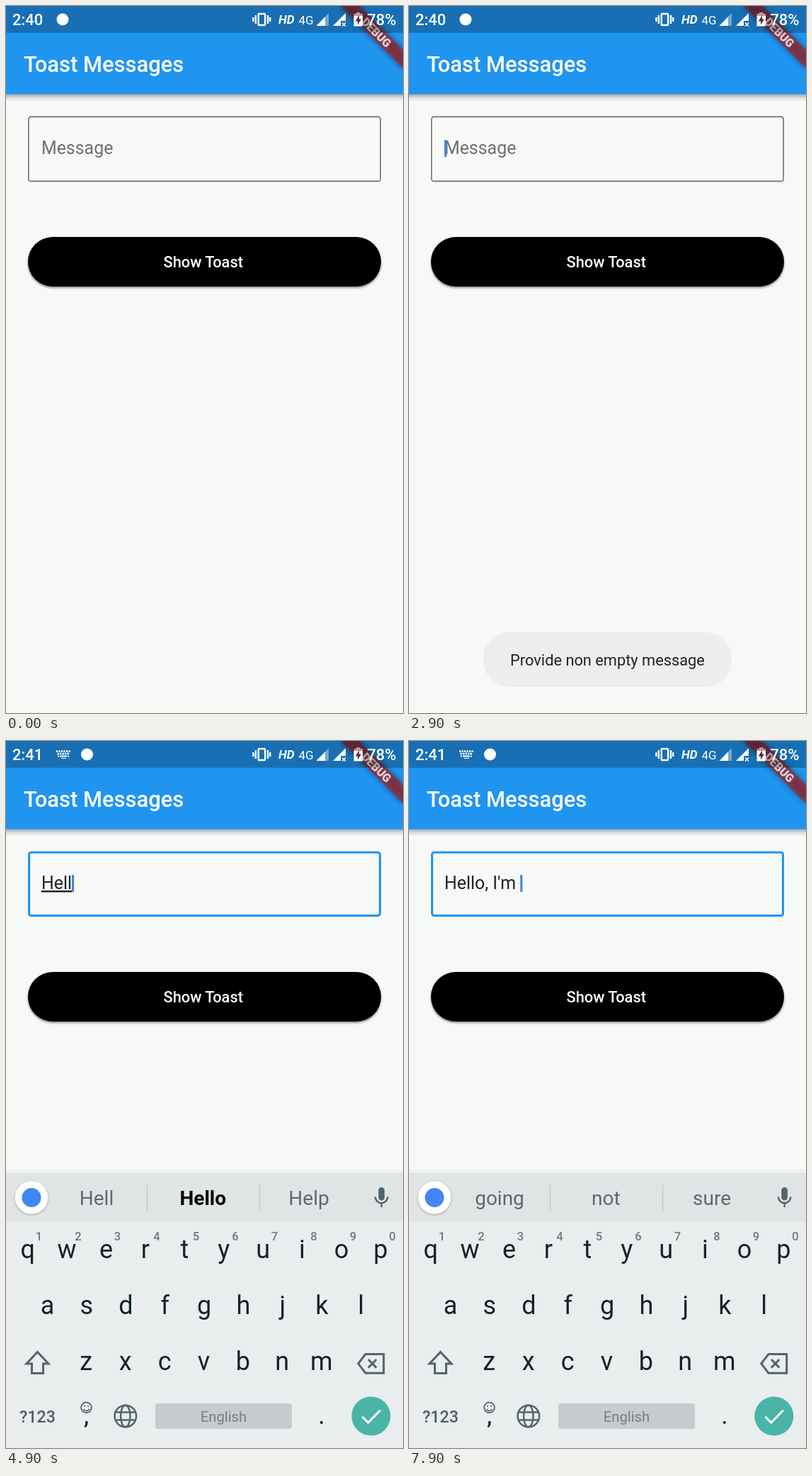
Write an HTML page that moves like this. It is 561 px wide and 998 px high and loops after 8000 ms.

```html
<!DOCTYPE html>
<html lang="en">
<head>
<meta charset="utf-8">
<title>Toast Messages</title>
<style>
  html, body { margin: 0; width: 100%; height: 100%; overflow: hidden; background: #f7f9f7; }
  svg { display: block; width: 100%; height: 100%; }
  text { font-family: Roboto, sans-serif; white-space: pre; }
  .mid { text-anchor: middle; }
  .medium { font-weight: 500; }
  .line { fill: none; stroke: #54646b; stroke-width: 3; }
  .keys { font-size: 36px; fill: #14232a; }
  .digits { font-size: 16.5px; fill: #6c7a80; }
  .words { font-size: 28px; fill: #5d6a70; }
  .words .strong { font-weight: 700; fill: #000; }
  .composing { text-decoration: underline; text-decoration-thickness: 1.5px; }

  .press, .button, .toast, .board, .rest, .focus, .hint {
    animation: 8s linear infinite;
  }
  .press { animation-name: press; }
  .button { animation-name: lift; }
  .toast { animation-name: toast; }
  .board { animation-name: board; }
  .rest { animation-name: rest; }
  .focus { animation-name: focus; }
  .hint { animation-name: hint; }

  /* 1% is 80 ms */
  @keyframes press {
    0%, 12.2% { opacity: 0; }
    13.5%, 15% { opacity: .25; }
    18.2%, 100% { opacity: 0; }
  }
  @keyframes lift {
    0%, 12.2%, 18.2%, 100% { filter: drop-shadow(0 2.5px 1.8px rgba(0, 0, 0, .45)); }
    14%, 15.5% { filter: drop-shadow(0 5px 4px rgba(0, 0, 0, .4)); }
  }
  @keyframes toast {
    0%, 15.6% { opacity: 0; }
    19.4%, 41.2% { opacity: 1; }
    46.2%, 100% { opacity: 0; }
  }
  @keyframes board {
    0%, 37.4% { opacity: 0; transform: translateY(39px); animation-timing-function: cubic-bezier(.22, 1, .36, 1); }
    42.2%, 100% { opacity: 1; transform: none; }
  }
  @keyframes rest {
    0%, 37% { opacity: 1; }
    39%, 100% { opacity: 0; }
  }
  @keyframes focus {
    0%, 37% { opacity: 0; }
    39%, 100% { opacity: 1; }
  }
  @keyframes hint {
    0%, 50.9% { opacity: 1; }
    53.3%, 100% { opacity: 0; }
  }
</style>
</head>
<body>
<svg viewBox="0 0 561 998" preserveAspectRatio="none">
  <defs>
    <filter id="soft" x="-30%" y="-100%" width="160%" height="300%"><feGaussianBlur stdDeviation="4"/></filter>
    <linearGradient id="shade" x2="0" y2="1">
      <stop offset="0" stop-opacity=".34"/>
      <stop offset=".5" stop-opacity=".11"/>
      <stop offset="1" stop-opacity="0"/>
    </linearGradient>
  </defs>
  <rect width="561" height="998" fill="#f7f9f7"/>

  <!-- App bar -->
  <rect y="124" width="561" height="11" fill="url(#shade)"/>
  <rect width="561" height="124.6" fill="#2095f0"/>
  <text class="medium" x="25" y="93" font-size="30.9" fill="#fff">Toast Messages</text>

  <!-- Message field -->
  <rect class="rest" x="31.8" y="156.4" width="497.4" height="91" rx="3.5" fill="none" stroke="#6f7170" stroke-width="1.6"/>
  <rect class="focus" x="32.6" y="157.2" width="495.9" height="89.3" rx="3" fill="none" stroke="#2095f0" stroke-width="3.1"/>
  <g font-size="24.93">
    <text class="hint" x="49.9" y="209" fill="#6f7170">Message</text>
    <text id="typed" x="49.9" y="209" fill="#222"><tspan id="done"></tspan><tspan id="word" class="composing"></tspan></text>
  </g>
  <rect id="cursor" y="189" width="3.1" height="24" fill="#4285e0"/>

  <!-- Button -->
  <rect class="button" x="31" y="326" width="499" height="70" rx="35"/>
  <rect class="press" x="31" y="326" width="499" height="70" rx="35" fill="#bcbcbc"/>
  <text class="mid medium" x="278.7" y="369" font-size="21.8" fill="#fff">Show Toast</text>

  <!-- Corner banner -->
  <g transform="translate(561) rotate(45)">
    <rect x="-62.3" y="43.6" width="124.7" height="18.7" opacity=".45" filter="url(#soft)"/>
    <rect x="-62.3" y="43.6" width="124.7" height="18.7" fill="#b71c1c" opacity=".627"/>
    <text class="mid" y="58.6" font-size="15.9" font-weight="900" fill="#e9dfe0">DEBUG</text>
  </g>

  <!-- Status bar -->
  <rect width="561" height="37.8" opacity=".25"/>
  <g fill="#fff">
    <text id="clock" class="medium" x="9" y="27" font-size="22">2:40</text>
    <g id="typing" fill="none" stroke="#fff">
      <path d="M71 14.5H91M72.5 18H90" stroke-width="2.4" stroke-dasharray="2.4 1.1"/>
      <path d="M73 21.5H89" stroke-width="2.2" stroke-dasharray="2 1 10 1 2"/>
      <path d="M78 24.5H85" stroke-width="1"/>
    </g>
    <circle id="badge" cx="80" cy="19" r="8.5"/>
    <g fill="none" stroke="#fff" stroke-width="2.4">
      <rect x="356.7" y="11" width="9.4" height="16" rx="1"/>
      <path d="M352.8 13V25M370 13V25M349.4 16V22M373.2 16V22"/>
    </g>
    <text x="385" y="25" font-size="17.2" font-weight="700" font-style="italic">HD</text>
    <text x="413.5" y="25.5" font-size="17">4G</text>
    <path d="M438.5 28L456 10V28Z" opacity=".4"/>
    <path d="M438.5 28L451 15.2V28Z"/>
    <path d="M462 28L480 10V21H473V28Z"/>
    <path d="M475 23.5L480 28.5M480 23.5L475 28.5" stroke="#fff" stroke-width="1.5"/>
    <path d="M491.5 11H495V9H500.5V11H504V14H491.5Z" opacity=".55"/>
    <path d="M491.5 14H504V28.5H491.5Z"/>
    <path d="M499 13L493.8 21.5H497V26.5L502 18.5H499Z" fill="#4d2b40"/>
    <text class="medium" x="510.3" y="27" font-size="22">78%</text>
  </g>

  <!-- Keyboard -->
  <g class="board">
    <rect y="605" width="561" height="5" opacity=".03"/>
    <rect y="609.5" width="561" height="400" fill="#e9edee"/>
    <rect y="609.5" width="561" height="69" fill="#e0e4e5"/>
    <path d="M199.5 627V663M358.5 627V663" stroke="#c3c9ca" stroke-width="1.5"/>
    <circle cx="36" cy="644.5" r="23.3" fill="#fff" style="filter: drop-shadow(0 1px 1.5px rgba(0,0,0,.3))"/>
    <circle cx="36" cy="644.5" r="13.5" fill="#4285f4"/>
    <g id="words" class="words mid">
      <text x="128" y="655"></text><text x="278.3" y="655"></text><text x="428" y="655"></text>
    </g>
    <rect x="526.3" y="630" width="8.6" height="18.5" rx="4.3" fill="#54646b"/>
    <path class="line" stroke-width="2.5" d="M521.8 643.5A8.8 8.8 0 0 0 539.4 643.5M530.6 652V658" style="stroke-width:2.4"/>
    <g id="keys" class="keys mid"></g>
    <g id="digits" class="digits mid medium"></g>
    <path class="line" d="M44.5 862.5L60 879H52.5V892.5H36.5V879H29Z"/>
    <path class="line" d="M508 865.5H533.7V892.2H508L497.8 878.8Z"/>
    <path class="line" d="M512 873L523.4 884.6M523.4 873L512 884.6"/>
    <text class="mid medium" x="44.5" y="961.5" font-size="23.3" fill="#4f5f66">?123</text>
    <g class="keys mid"><text x="113.5" y="964">,</text><text x="446" y="964">.</text></g>
    <g class="line" style="stroke-width:1.8">
      <circle cx="113.5" cy="941" r="7.4"/>
      <path d="M109.5 943A4.4 4.4 0 0 0 117.5 943M110 938.7H112M115 938.7H117"/>
    </g>
    <g class="line" style="stroke-width:2.5">
      <circle cx="168.8" cy="953" r="15.3"/>
      <ellipse cx="168.8" cy="953" rx="6.8" ry="15.3"/>
      <path d="M155 947.5H182.6M155 958.5H182.6"/>
    </g>
    <rect x="211" y="935" width="193" height="36" rx="4" fill="#c7cbcd"/>
    <text class="mid" x="307.5" y="960.5" font-size="20.2" fill="#747e83">English</text>
    <circle cx="515.8" cy="953" r="27.5" fill="#4ab5a6"/>
    <path d="M503.5 954L511.8 962.2L528.8 944.8" fill="none" stroke="#fff" stroke-width="3"/>
  </g>

  <!-- Toast -->
  <g class="toast">
    <rect x="105" y="884" width="351" height="77" rx="37" fill="#ebedec" opacity=".93"/>
    <text class="mid" x="280.5" y="931" font-size="21.8" fill="#222">Provide non empty message</text>
  </g>
</svg>
<script>
  const LOOP = 8000, FOCUS = 2880, BOARD_READY = 3480;
  const $ = id => document.getElementById(id);

  // Start time, finished text, word being composed, suggestions
  const steps = [
    [0, "", "", "the I hi"],
    [4080, "", "H", "H Hi How"],
    [4480, "", "He", "He Hello Hey"],
    [4680, "", "Hel", "Hel Hello Help"],
    [4880, "", "Hell", "Hell Hello Help"],
    [5280, "", "Hello", "Hell Hello Hellos"],
    [5780, "Hello,", "", "you to are"],
    [6280, "Hello, ", "", "you to are"],
    [6780, "Hello, ", "I", "I'm I I'll"],
    [7280, "Hello, ", "I'm", "in I'm I'll"],
    [7780, "Hello, I'm ", "", "going not sure"]
  ];

  function addRow(parent, chars, x, y, gap) {
    [...chars].forEach((char, i) => {
      const el = document.createElementNS("http://www.w3.org/2000/svg", "text");
      el.setAttribute("x", x + gap * i);
      el.setAttribute("y", y);
      el.textContent = char;
      parent.append(el);
    });
  }
  addRow($("keys"), "qwertyuiop", 30.7, 729.5, 55.4);
  addRow($("keys"), "asdfghjkl", 58.5, 808.5, 55.4);
  addRow($("keys"), "zxcvbnm", 113.3, 887.5, 55.4);
  addRow($("digits"), "1234567890", 46.5, 704.5, 55.5);

  let shown;
  function showStep(step) {
    if (step === shown) return;
    shown = step;
    const [, done, word, list] = step;
    $("done").textContent = done;
    $("word").textContent = word;
    list.split(" ").forEach((text, i) => {
      const el = $("words").children[i];
      el.textContent = text;
      el.classList.toggle("strong", i === 1 && word !== "");
    });
    const width = done || word ? $("typed").getComputedTextLength() : 0;
    $("cursor").setAttribute("x", 49.9 + width);
  }

  let start;
  function draw() {
    const now = performance.now();
    start ??= now;
    const t = (now - start) % LOOP;
    const step = steps.findLast(s => s[0] <= t);
    showStep(step);

    const sinceEdit = t - Math.max(step[0], FOCUS);
    const lit = sinceEdit >= 0 && sinceEdit % 1000 < 500;
    $("cursor").style.opacity = lit ? 1 : 0;

    const ready = t >= BOARD_READY;
    $("clock").textContent = ready ? "2:41" : "2:40";
    $("typing").style.opacity = ready ? 1 : 0;
    $("badge").setAttribute("cx", ready ? 114.5 : 80);
    requestAnimationFrame(draw);
  }
  draw();
</script>
</body>
</html>
```
